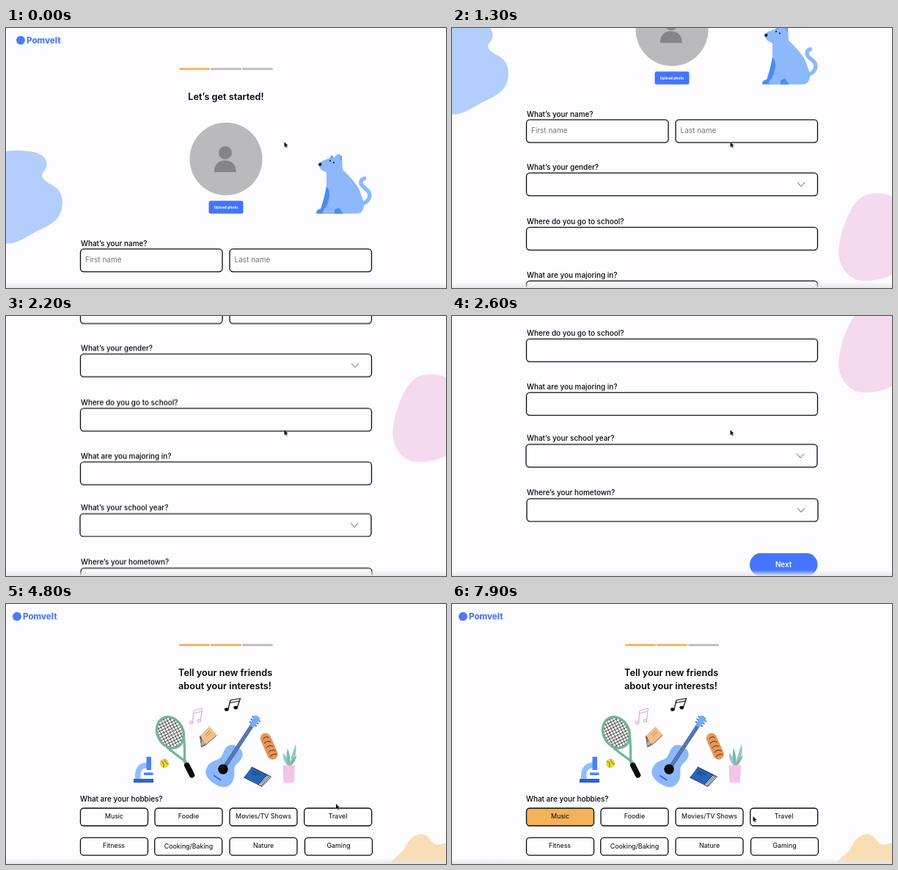
These frames come from a looping animation (600x354 px, 8000 ms). An HTML page:

```html
<!DOCTYPE html>
<html lang="en">
<head>
<meta charset="utf-8">
<title>Sign-up flow</title>
<style>
html, body { margin: 0; width: 100%; height: 100%; overflow: hidden; background: #fdfcfe; }
svg { display: block; width: 100vw; height: 100vh; }
text { font-family: Inter, "Open Sans", sans-serif; fill: #050506; }
.title { font-size: 12.7px; font-weight: 600; }
.label { font-size: 9.95px; font-weight: 500; }
.hint { font-size: 10px; fill: #77777b; }
.mid { text-anchor: middle; }
.brand { font-size: 11.5px; font-weight: 800; fill: #4b7bf5; }
.box { fill: #fdfcfe; stroke: #0b0b0d; stroke-width: 1.3; }
.chev { fill: none; stroke: #44444a; stroke-width: .9; }
.chip { font-size: 8.9px; text-anchor: middle; }
.on { fill: #f2ae53; }
.off { fill: #b9b8bb; }
.line { fill: none; stroke-linecap: round; stroke-linejoin: round; }

.anim { animation: 8s linear infinite; }
#form { animation-name: first; animation-timing-function: step-end; }
#hobbies { animation-name: second; animation-timing-function: step-end; }
#page { animation-name: scroll; }
#cursor { animation-name: move; }
#picked { animation-name: pick; animation-timing-function: step-end; }

@keyframes first { 0% { visibility: visible } 50%, 100% { visibility: hidden } }
@keyframes second { 0% { visibility: hidden } 50%, 100% { visibility: visible } }
@keyframes pick { 0% { fill: #fdfcfe } 90%, 100% { fill: #f2b25a } }
@keyframes scroll {
  0% { transform: translateY(0) }
  10% { transform: translateY(-125px) }
  22.5% { transform: translateY(-227px) }
  32.5% { transform: translateY(-416px) }
  33.75% { transform: translateY(-445px); animation-timing-function: ease-out }
  40%, 100% { transform: translateY(-482px) }
}
@keyframes move {
  0%, 40% { transform: translate(379.5px, 155px); animation-timing-function: ease-in-out }
  45% { transform: translate(424px, 264px) }
  46.25%, 50% { transform: translate(426px, 265px); animation-timing-function: ease-out }
  58.75%, 81.25% { transform: translate(450px, 272px); animation-timing-function: ease-in-out }
  88.75%, 91.25% { transform: translate(165px, 289px); animation-timing-function: ease-in-out }
  98.75%, 100% { transform: translate(410.5px, 289px) }
}
</style>
</head>
<body>
<svg viewBox="0 0 600 354" preserveAspectRatio="none">
<defs>
  <linearGradient id="shade" x2="0" y2="1">
    <stop offset="0" stop-color="#e6e5e7" stop-opacity="0"/>
    <stop offset="1" stop-color="#e6e5e7"/>
  </linearGradient>
  <clipPath id="strings"><ellipse rx="17" ry="21.5"/></clipPath>
  <path id="chevron" class="chev" d="M-5-2.8 0 2.8 5-2.8"/>
  <g id="brand">
    <circle cx="6" cy="17" r="6" fill="#4b7bf5"/>
    <text class="brand" x="14" y="21">Pomvelt</text>
  </g>
  <rect id="bar" width="42" height="2.8" rx="1.4" y="54.5"/>
</defs>

<g id="form" class="anim"><g id="page" class="anim">
  <path fill="#b3cdfd" d="M0 168C12 166 31 167 41 170C52 173 58 182 55 190C53 196 47 198 50 204C53 211 67 213 73 223C79 233 78 248 71 258C62 270 46 274 33 282C21 289 12 294 0 294Z"/>
  <path fill="#f5d9ee" d="M600 406C590 400 573 399 561 405C549 411 541 428 535 444C529 460 526 478 528 490C531 504 541 517 555 520C573 522 590 518 600 512Z"/>
  <use href="#brand" x="14"/>
  <use href="#bar" class="on" x="236"/>
  <use href="#bar" class="off" x="279"/>
  <use href="#bar" class="off" x="322"/>
  <text class="title mid" x="300" y="98.5">Let’s get started!</text>

  <circle cx="300" cy="178.5" r="49.5" fill="#bab9bb"/>
  <g fill="#858487">
    <circle cx="299" cy="170" r="9"/>
    <path d="M283.7 196.5C283.7 186 290 180.5 298.7 180.5S313.7 186 313.7 196.5Z"/>
  </g>
  <rect x="276.5" y="235.5" width="47" height="17.5" rx="2.5" fill="#4475fa"/>
  <text class="mid" x="300" y="246" style="font-size:5px;font-weight:700;fill:#fff">Upload photo</text>

  <g id="dog">
    <path class="line" stroke="#8db8fa" stroke-width="5.5" d="M484 240C493 238 498 231 495 224C492 218 484 217 484 211Q484 206 488.500 205"/>
    <path fill="#8db8fa" d="M426.5 186Q427 183 432 181L441 177.5 443.5 174 447 176.5 453 171.5 458 174 459 193C469 203 481 214 484 227Q490 240 487 247Q485 253 477 253H432L437 215V197Q429 194 426.500 188Z"/>
    <path fill="#4a8cf4" d="M437 216Q442 221 441 231Q439 240 436 245L435 253H423Q423 247 429 246.5Q433 236 437 216ZM446 253Q447 246 454 245L460 253Z"/>
    <path fill="#8db8fa" d="M442 220 453 238Q447 244 448 253H432Q432 246 437 245Q441 234 442 220Z"/>
    <path fill="#6da2f7" d="M447 176.5 444 173 442 179ZM458 174 454 178 458 182Z"/>
    <ellipse cx="428.3" cy="185.8" rx="2.2" ry="2" fill="#0b0b0d"/>
    <circle cx="442" cy="181" r="1"/>
    <circle cx="447" cy="183.3" r="1"/>
  </g>

  <text class="label" x="102" y="297">What’s your name?</text>
  <rect class="box" x="101.5" y="301" width="193.5" height="31" rx="4.5"/>
  <rect class="box" x="305" y="301" width="193.5" height="31" rx="4.5"/>
  <text class="hint" x="108" y="319">First name</text>
  <text class="hint" x="311.5" y="319">Last name</text>

  <text class="label" x="102" y="369">What’s your gender?</text>
  <rect class="box" x="101.5" y="373.5" width="397" height="31" rx="4.5"/>
  <use href="#chevron" x="476" y="389"/>

  <text class="label" x="102" y="443.5">Where do you go to school?</text>
  <rect class="box" x="101.5" y="447.5" width="397" height="31" rx="4.5"/>

  <text class="label" x="102" y="516">What are you majoring in?</text>
  <rect class="box" x="101.5" y="520.5" width="397" height="31" rx="4.5"/>

  <text class="label" x="102" y="586.5">What’s your school year?</text>
  <rect class="box" x="101" y="591" width="397" height="31" rx="4.5"/>
  <use href="#chevron" x="475" y="606.5"/>

  <text class="label" x="102" y="660.5">Where’s your hometown?</text>
  <rect class="box" x="102" y="665" width="397" height="31" rx="4.5"/>
  <use href="#chevron" x="476" y="680.5"/>

  <rect x="406" y="739" width="92.5" height="31.5" rx="15.75" fill="#4475fa"/>
  <text class="mid" x="452" y="758" style="font-size:9.8px;font-weight:600;fill:#fff">Next</text>
</g></g>

<g id="hobbies" class="anim">
  <path fill="#f9deb5" d="M524 354C530 343 540 341 545 330C550 319 558 313 567 313.5C578 314 578 325 587 327.5C592 329 596 325 600 326V354Z"/>
  <use href="#brand" x="9"/>
  <use href="#bar" class="on" x="236"/>
  <use href="#bar" class="on" x="279"/>
  <use href="#bar" class="off" x="322"/>
  <text class="title" x="235" y="98">Tell your new friends</text>
  <text class="title" x="235" y="116">about your interests!</text>

  <g id="racket" transform="translate(224 175) rotate(-27)">
    <ellipse rx="17" ry="21.5" fill="#fff"/>
    <g id="net" clip-path="url(#strings)" stroke="#222" stroke-width=".7"></g>
    <ellipse class="line" rx="17.5" ry="22" stroke="#74b597" stroke-width="3.4"/>
    <path class="line" stroke="#74b597" stroke-width="3.2" d="M-13 16Q-7 30 0 43Q7 30 13 16"/>
    <path stroke="#74b597" stroke-width="4.5" d="M0 39V47"/>
    <path class="line" stroke="#0b0b0d" stroke-width="7.5" d="M0 50V65"/>
  </g>

  <g id="ball">
    <circle cx="216" cy="217" r="6" fill="#e8d73c"/>
    <path class="line" stroke="#55521f" stroke-width=".8" d="M211.5 214Q217 216 214.5 222.5M216.5 211.2Q216.5 217 221.7 218"/>
  </g>

  <g id="microscope">
    <path fill="none" stroke="#93bcfb" stroke-width="7.5" d="M193 219.5C183 219.500 178.5 226 180 238"/>
    <path fill="#4a83f2" d="M191.5 208H198V226H191.500ZM188 229.5H200.5V233H188Z"/>
    <path fill="#2c63c8" d="M174 238H201V243.300H174Z"/>
  </g>

  <g class="line" stroke="#eba3d8" stroke-width="1.2">
    <path d="M254.5 161 256 145 267.5 142 265.5 158M255.8 149 267 146"/>
    <ellipse cx="252.7" cy="161.5" rx="2.2" ry="1.7"/>
    <ellipse cx="263.5" cy="158.7" rx="2.2" ry="1.7"/>
  </g>
  <g class="line" stroke="#0b0b0d" stroke-width="1.2">
    <path d="M303 143 306 131 319.5 128.5 315.5 140.5M305.3 134.5 318.5 132"/>
    <g fill="#0b0b0d">
      <ellipse cx="300.8" cy="143.5" rx="2.3" ry="1.7"/>
      <ellipse cx="313.3" cy="141" rx="2.3" ry="1.7"/>
    </g>
  </g>

  <g id="novel">
    <path fill="#f5bd88" d="M264.5 179.5 277.5 166.5 287.5 178.5 272 192Z"/>
    <path class="line" stroke="#333" stroke-width=".8" d="M264.5 180 266.5 194.5 273 191.5 287 179M265 181 268.5 193.5M265.5 181 271 192.5M266.5 194.5 272 190"/>
    <path class="line" stroke="#a8713c" stroke-width=".7" d="M272 178 277 173M274 180 279 175"/>
  </g>

  <g id="guitar" transform="translate(296 225) rotate(33.5)">
    <path fill="#8cb8fb" d="M0-36C-8-37-13-32-13-25C-13-18-10-15-12-10C-14-5-20-1-20 8C-20 19-11 23 0 23S20 19 20 8C20-1 14-5 12-10C10-15 13-18 13-25C13-32 8-37 0-36Z"/>
    <path fill="#3f619f" d="M-2.6-2V-72H2.600V-2Z"/>
    <path stroke="#9db9e6" stroke-width=".5" d="M-.9-2V-72M.9-2V-72"/>
    <circle r="6.8" fill="#0b0b0d"/>
    <path stroke="#345fae" stroke-width="1.6" d="M-6 14H6"/>
    <path fill="#78aaf8" d="M-3-70-4.5-85Q0-88 4.5-85L3-70Z"/>
    <path class="line" stroke="#4b86ea" stroke-width="2.2" d="M-6-82H-5M-5.5-78H-4.5M-5-74H-4M5-82H6M4.5-78H5.5M4-74H5"/>
  </g>

  <g id="bread">
    <path class="line" stroke="#e5965a" stroke-width="14.5" d="M354 183 363.5 204.5"/>
    <path class="line" stroke="#7c4321" stroke-width="1.1" d="M351 184Q354 179 358 182M352 190Q356 185 361 188M355 196Q359 191 364 194M358 202Q362 197 367 200M360 208Q364 203 369 205"/>
  </g>

  <g id="album">
    <path fill="#fff" d="M335 222 361.5 235 350 248.5 324.5 237Z"/>
    <path fill="#2566b8" d="M335 222 356.5 232.5 344.5 245.5 324.5 236Z"/>
    <path class="line" stroke="#14233f" stroke-width="1" d="M335 222 361 235M324.500 236 349 248.5 361 235.5M356.500 232.5 344.5 245.5M358 233.5 346.5 246M359.5 234.5 348 247.5"/>
    <path class="line" stroke="#14346f" stroke-width=".9" d="M336 227.5 346 232.5M334.5 230 341 233"/>
  </g>

  <g id="plant">
    <path fill="#8ec8cf" d="M384 220Q376 211 378.5 203Q384 209 386 220ZM386 220Q390 204 395 190.5Q398 206 388 220Z"/>
    <path fill="#7fb8a4" d="M385 220Q381 207 384 196Q388.5 207 387 220ZM387 220Q389 211 396.5 206Q395 214 389 220Z"/>
    <path fill="#f5c3e8" d="M377.5 219.5H394L393 243.5H378.500Z"/>
  </g>

  <text class="label" x="101" y="268.5">What are your hobbies?</text>
  <rect class="box anim" id="picked" x="101.5" y="278" width="92" height="24" rx="4.5"/>
  <rect class="box" x="203" y="278" width="92" height="24" rx="4.5"/>
  <rect class="box" x="305" y="278" width="92" height="24" rx="4.5"/>
  <rect class="box" x="406.7" y="278" width="92" height="24" rx="4.5"/>
  <rect class="box" x="101.5" y="318.2" width="92" height="24" rx="4.5"/>
  <rect class="box" x="202.7" y="318.2" width="92" height="24" rx="4.5"/>
  <rect class="box" x="305" y="318.2" width="92" height="24" rx="4.5"/>
  <rect class="box" x="407.5" y="318.2" width="92" height="24" rx="4.5"/>
  <text class="chip" x="147.5" y="292">Music</text>
  <text class="chip" x="249" y="292">Foodie</text>
  <text class="chip" x="351" y="292">Movies/TV Shows</text>
  <text class="chip" x="452.5" y="292">Travel</text>
  <text class="chip" x="147" y="332.2">Fitness</text>
  <text class="chip" x="249" y="332.6">Cooking/Baking</text>
  <text class="chip" x="351" y="332.2">Nature</text>
  <text class="chip" x="453.5" y="332.2">Gaming</text>
</g>

<rect y="346" width="600" height="8" fill="url(#shade)"/>
<g id="cursor" class="anim">
  <path d="M0 0V7.2L1.6 5.7 2.7 8.3 3.9 7.8 2.8 5.3H5Z" fill="#0b0b0d" stroke="#fff" stroke-width=".5" paint-order="stroke"/>
</g>
</svg>
<script>
// Racket strings
let d = "";
for (let p = -20; p <= 20; p += 4) d += `M${p}-24V24M-20 ${p}H20`;
document.getElementById("net").innerHTML = `<path d="${d}"/>`;
</script>
</body>
</html>
```
